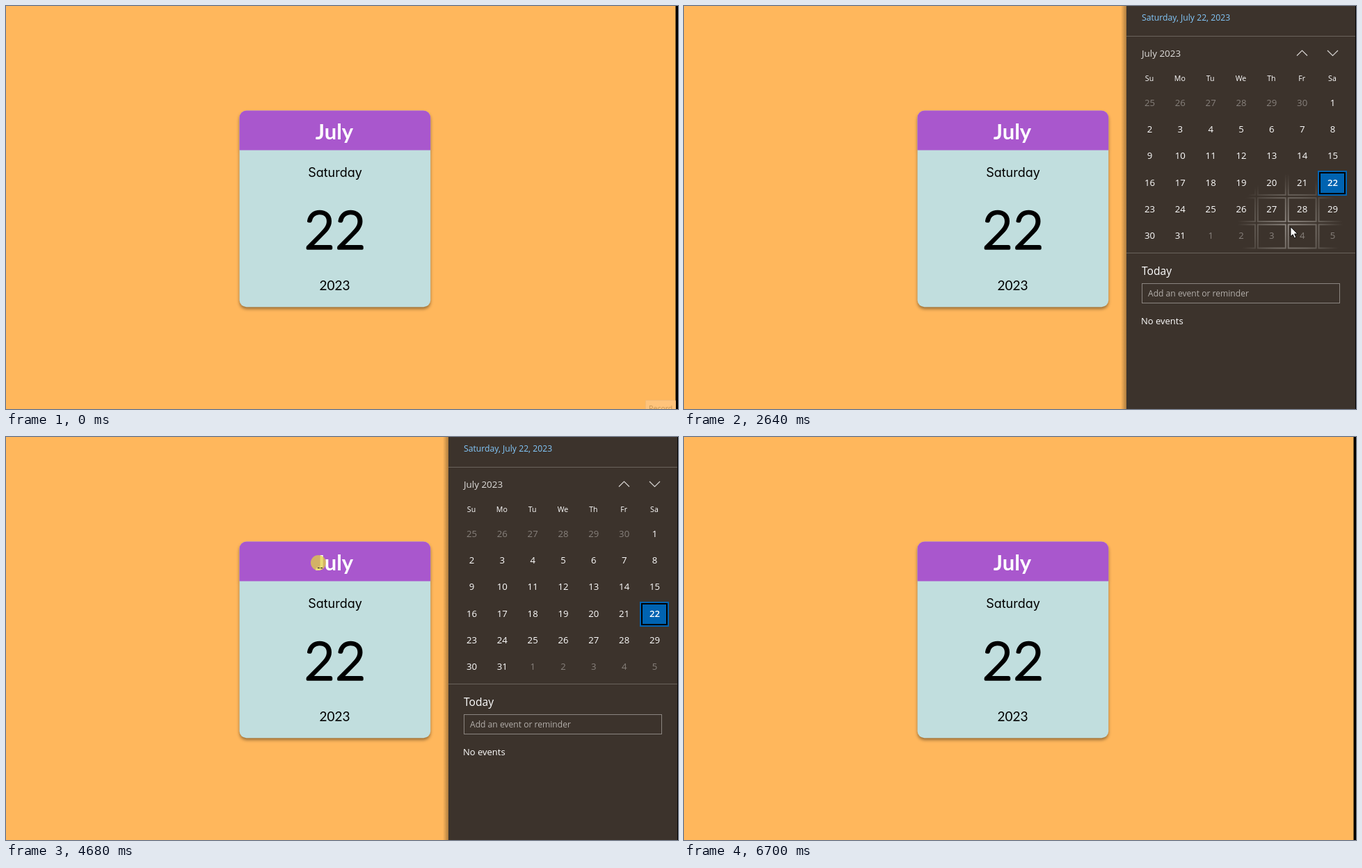
Animation, 966 px wide and 580 px high, one loop 7320 ms. Source, as an HTML page:

```html
<!DOCTYPE html>
<html lang="en">
<head>
<meta charset="utf-8">
<title>Calendar card</title>
<style>
  html, body { margin: 0; width: 100%; height: 100%; overflow: hidden; background: #ffb75c; }
  svg { display: block; width: 966px; height: 580px; }
  .mid { text-anchor: middle; }
  .card { filter: drop-shadow(0 3px 2px rgba(0, 0, 0, .38)); }
  .month { font: bold 31px Lato, sans-serif; fill: #fff; }
  .weekday { font: 18px Inter, sans-serif; font-feature-settings: "cv11"; }
  .day {
    font: 300 75px Lato, sans-serif; letter-spacing: 1px;
    stroke: #000; stroke-width: 3.4; stroke-linejoin: round;
  }
  .year { font: 19px Lato, sans-serif; }
  #panel { font: 13.2px "Open Sans", "Noto Sans", sans-serif; fill: #fff; }
  .line { fill: none; stroke: #6a635c; }
  .chevron { fill: none; stroke: #d6d3d1; stroke-width: 1.2; }
  .head { font-size: 10.6px; }
  .dim { fill: #87817c; }
</style>
</head>
<body>
<svg viewBox="0 0 966 580">
  <defs>
    <radialGradient id="glow" gradientUnits="userSpaceOnUse" r="76">
      <stop offset="0" stop-color="#8f8882"/>
      <stop offset=".5" stop-color="#6d665f"/>
      <stop offset="1" stop-color="#6d665f" stop-opacity="0"/>
    </radialGradient>
    <linearGradient id="shade">
      <stop offset="0" stop-opacity="0"/>
      <stop offset="1" stop-opacity=".32"/>
    </linearGradient>
  </defs>

  <rect width="966" height="580" fill="#ffb75c"/>
  <rect x="962.5" width="3.5" height="580"/>

  <g class="card">
    <rect x="335.6" y="150.6" width="274.6" height="282.6" rx="10" fill="#c1dede"/>
    <path d="M335.6 207.5V160.6a10 10 0 0 1 10-10H600.2a10 10 0 0 1 10 10V207.5Z" fill="#a957cd"/>
  </g>
  <g class="mid">
    <text class="month" x="472" y="191.5">July</text>
    <text class="weekday" x="473" y="246">Saturday</text>
    <text class="day" x="473.5" y="349.3">22</text>
    <text class="year" x="472.5" y="409">2023</text>
  </g>

  <g id="button">
    <rect x="919.5" y="567.5" width="43" height="20" rx="1" fill="#ffc37b" stroke="#f3b974"/>
    <text x="924" y="583" font-family="Open Sans, sans-serif" font-size="10.5" fill="#c99552">Record</text>
  </g>

  <g id="panel">
    <rect x="628" width="8" height="580" fill="url(#shade)"/>
    <rect x="636" width="329" height="580" fill="#3c332c"/>
    <rect x="965" width="1" height="580" fill="#000"/>
    <path class="line" d="M636 43.5H965M636 355.5H965"/>
    <text x="658" y="21" font-size="12.2" fill="#83c8fb">Saturday, July 22, 2023</text>
    <text x="658" y="73" font-size="13.4" fill="#e0dedc">July 2023</text>
    <path class="chevron" d="M881 71.5l7.5-7.5 7.5 7.5M925 64l7.5 7.5 7.5-7.5"/>
    <g id="cells" fill="none" stroke="url(#glow)" stroke-width="2"></g>
    <rect x="911" y="237" width="42" height="36" fill="#0063b1"/>
    <rect x="913" y="239" width="38" height="32" fill="#000"/>
    <rect x="915" y="241" width="34" height="28" fill="#0063b1"/>
    <g id="dates" class="mid"></g>
    <text x="658" y="387" font-size="15.6">Today</text>
    <rect class="line" x="658.5" y="399.5" width="284" height="28" style="stroke:#8b8580"/>
    <text x="667" y="418" font-size="12.1" fill="#b3aeaa">Add an event or reminder</text>
    <text x="657" y="457.5" font-size="13">No events</text>
  </g>

  <circle id="click" cx="449" cy="181" r="11" fill="#e2cf43" fill-opacity=".75"/>
  <path id="beam" d="M448 188.5h3m1 0h3" stroke="#222" fill="none"/>
  <path id="arrow" d="M.5 .5V14.5L3.7 11.6 5.9 16.8 8.3 15.8 6.1 10.7H10.5Z" fill="#fff" stroke="#000" stroke-width=".9"/>
</svg>
<script>
  const LOOP = 7320;
  const $ = id => document.getElementById(id);
  const show = (id, on) => $(id).style.display = on ? '' : 'none';

  const make = (parent, tag, attrs, text = '') => {
    const el = document.createElementNS('http://www.w3.org/2000/svg', tag);
    for (const name in attrs) el.setAttribute(name, attrs[name]);
    el.textContent = text;
    parent.append(el);
  };

  // Month grid
  const colX = i => 669 + 43.83 * i;
  ['Su', 'Mo', 'Tu', 'We', 'Th', 'Fr', 'Sa'].forEach((name, i) =>
    make($('dates'), 'text', { x: colX(i), y: 108, class: 'head' }, name));
  for (let i = 0; i < 42; i++) {
    const date = new Date(2023, 5, 25 + i), day = date.getDate();
    const inMonth = date.getMonth() === 6;
    const x = colX(i % 7), y = 139 + 38.3 * Math.floor(i / 7);
    make($('cells'), 'rect', { x: x - 19.5, y: y - 16, width: 40, height: 34 });
    make($('dates'), 'text', {
      x: x + .5, y: y + 4.7,
      class: inMonth ? '' : 'dim',
      'font-weight': inMonth && day === 22 ? 600 : 400
    }, day);
  }

  // Pointer moves: start, end, pictures, from x, y, to x, y
  const moves = [
    [2260, 2760, 5, 888, 471, 866, 266],
    [3010, 3010, 1, 868, 242, 868, 242],
    [3180, 3305, 2, 782, 158, 686, 90],
    [3427, 3550, 2, 695, 72, 701, 62],
    [4050, 4680, 6, 660, 83, 451, 187],
    [4820, 5190, 4, 451, 187, 446, 251],
    [5700, 6320, 6, 490, 284, 846, 548],
    [6450, 6700, 3, 861, 560, 875, 584]
  ];

  function pointer(t) {
    const move = moves.findLast(m => t >= m[0]);
    if (!move) return null;
    const [start, end, count, x0, y0, x1, y1] = move;
    if (count === 1) return [x0, y0];
    const p = Math.min(1, Math.floor((t - start) / (end - start) * (count - 1)) / (count - 1));
    return [x0 + (x1 - x0) * p, y0 + (y1 - y0) * p];
  }

  function draw(t) {
    const pos = pointer(t);
    const onText = t >= 4680 && t < 4943;
    show('button', t < 130);
    show('panel', t >= 1890 && t < 4820);
    show('click', t >= 4680 && t < 4820);
    show('beam', onText);
    show('arrow', pos && !onText && t < 6700);
    show('cells', pos && pos[0] > 636);
    if (!pos) return;
    $('arrow').setAttribute('transform', `translate(${pos})`);
    $('glow').setAttribute('cx', pos[0]);
    $('glow').setAttribute('cy', pos[1]);
  }

  const begin = performance.now();
  function tick() {
    draw((performance.now() - begin) % LOOP);
    requestAnimationFrame(tick);
  }
  tick();
</script>
</body>
</html>
```
